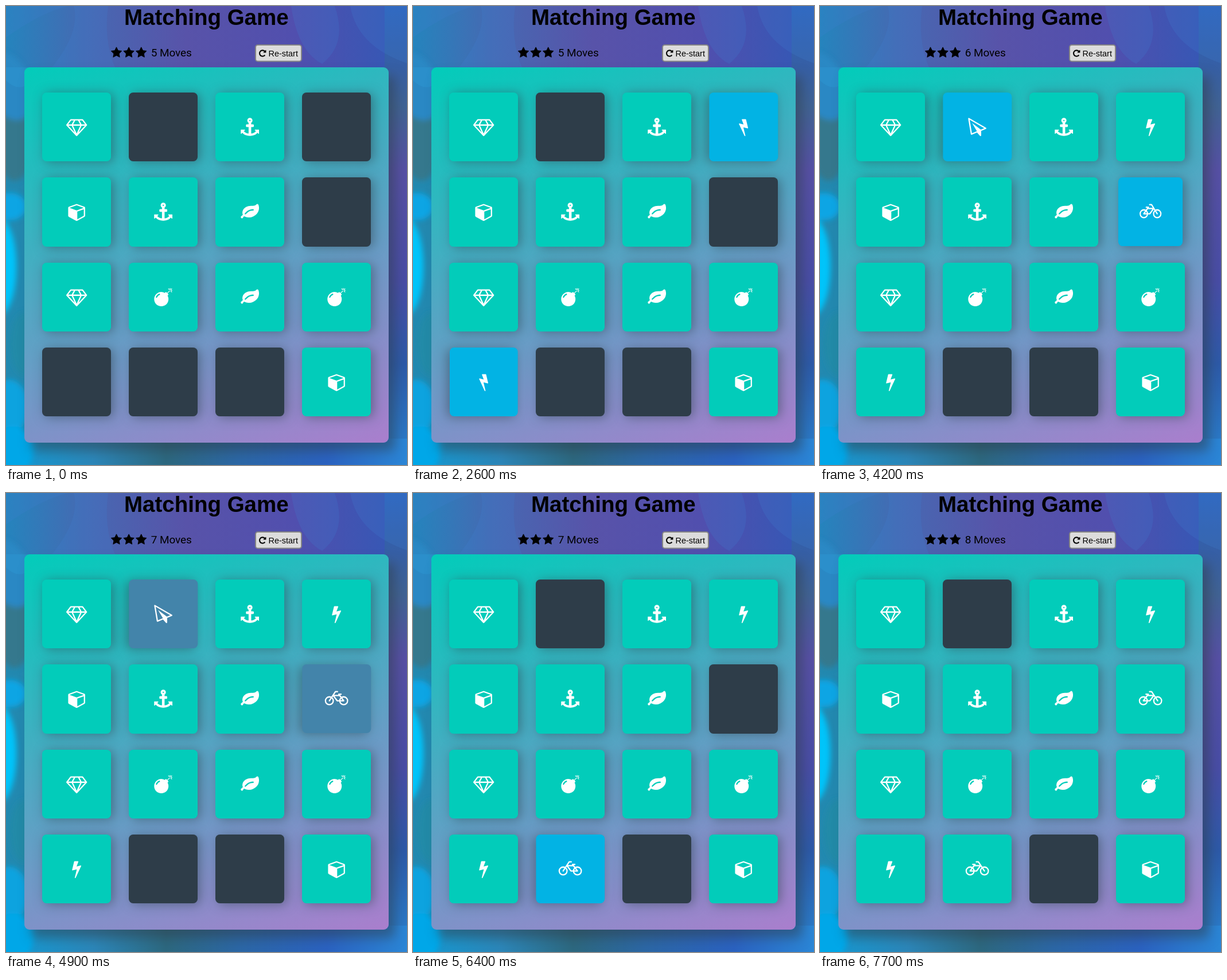
Animation of 699x801 px, one loop 8000 ms. Source, as an HTML page:

```html
<!DOCTYPE html>
<html lang="en">
<head>
<meta charset="utf-8">
<title>Matching Game</title>
<style>
html, body { margin: 0; width: 100%; height: 100%; overflow: hidden; }
#stage { position: relative; width: 699px; height: 801px; overflow: hidden; background: #2b86b8; }
#stage > svg { position: absolute; left: 0; top: 0; }
.deck {
  position: absolute; left: 32px; top: 107px; width: 635px; height: 654.5px; border-radius: 9px;
  background: linear-gradient(160deg, #02ccba 0%, #aa7ecd 100%);
  box-shadow: 11.5px 14.5px 19px 0 rgba(46, 61, 73, .5);
}
.card {
  position: absolute; width: 120.3px; height: 120.3px; border-radius: 7.7px;
  box-shadow: 4.8px 1.9px 19px 0 rgba(46, 61, 73, .5);
}
.card svg { position: absolute; left: 0; top: 0; }
.title { font: bold 38.5px "Liberation Sans", Arial, sans-serif; }
.moves { font: 19px Roboto, sans-serif; letter-spacing: -.1px; }
.label { font: 14.44px "Liberation Sans", Arial, sans-serif; }
</style>
</head>
<body>
<div id="stage">
  <svg width="699" height="801" viewBox="0 0 699 801">
    <defs>
      <linearGradient id="sky">
        <stop offset="0" stop-color="#2584bd"/>
        <stop offset=".2" stop-color="#4669b2"/>
        <stop offset=".45" stop-color="#5853a9"/>
        <stop offset=".72" stop-color="#514fae"/>
        <stop offset="1" stop-color="#3159b6"/>
      </linearGradient>
      <linearGradient id="edge" x2="0" y2="1">
        <stop offset="0" stop-color="#2e64bd"/>
        <stop offset=".13" stop-color="#365fa5"/>
        <stop offset=".22" stop-color="#416394"/>
        <stop offset=".36" stop-color="#5750a5"/>
        <stop offset=".6" stop-color="#494da6"/>
        <stop offset=".78" stop-color="#2d5aa8"/>
        <stop offset="1" stop-color="#2a83d1"/>
      </linearGradient>
      <linearGradient id="floor">
        <stop offset="0" stop-color="#139bd4"/>
        <stop offset=".22" stop-color="#2c86b8"/>
        <stop offset=".4" stop-color="#2d687f"/>
        <stop offset=".58" stop-color="#2c67a5"/>
        <stop offset=".8" stop-color="#2b62c0"/>
        <stop offset="1" stop-color="#2b86d6"/>
      </linearGradient>
      <filter id="soft" x="-30%" y="-30%" width="160%" height="160%"><feGaussianBlur stdDeviation="5"/></filter>
    </defs>
    <rect width="699" height="115" fill="url(#sky)"/>
    <rect y="107" width="40" height="694" fill="#2389b0"/>
    <rect x="660" width="39" height="801" fill="url(#edge)"/>
    <rect y="755" width="699" height="46" fill="url(#floor)"/>
    <g filter="url(#soft)">
      <ellipse cx="15" cy="215" rx="36" ry="90" fill="#36788d"/>
      <ellipse cx="5" cy="140" rx="38" ry="62" fill="#2b88c4" transform="rotate(-22 5 140)"/>
      <ellipse cx="6" cy="350" rx="30" ry="24" fill="#08a5e4"/>
      <ellipse cx="-12" cy="455" rx="30" ry="85" fill="#00c4fa"/>
      <ellipse cx="32" cy="590" rx="26" ry="55" fill="#248aa7"/>
      <ellipse cx="5" cy="700" rx="34" ry="48" fill="#0aa3df"/>
      <ellipse cx="12" cy="775" rx="36" ry="42" fill="#05a7e8"/>
    </g>
    <g fill="#3f7fd0" opacity=".22">
      <path d="M0 55Q60 12 108 0H0ZM80 107Q130 45 118 0H178Q170 60 190 107Z"/>
      <path d="M497 0Q508 78 551 101Q596 66 573 0ZM600 0Q612 70 699 100V0Z"/>
    </g>
    <path d="M0 130Q32 162 62 107H0Z" fill="#2d96d2" opacity=".5"/>
  </svg>
  <div class="deck"></div>
  <svg width="699" height="801" viewBox="0 0 699 801">
    <text class="title" x="206" y="33">Matching Game</text>
    <g id="stars"></g>
    <text class="moves" id="moves" x="252.8" y="87.5"></text>
    <rect x="435" y="68" width="80" height="28.5" rx="4" fill="#dcdcdc" stroke="#858585" stroke-width="2"/>
    <g id="repeat"></g>
    <text class="label" x="457.6" y="88">Re-start</text>
  </svg>
</div>
<script>
const LOOP = 8000, STEP = 100, FLIP = 800, TINT = 400;
const SIZE = 120.3, UNIT = 31.76 / 1792;
const DARK = [46, 61, 73], OPEN = [2, 179, 228], HIT = [2, 204, 186], MISS = [222, 19, 31];

const path = d => `<path d="${d}"/>`;
// glyphs: [width, markup] on an 1792 unit em
const glyphs = {
  diamond: [2048, path('M212 768l623 665-300-665h-323zm812 772l349-772h-698zm-486-900l204-384h-262l-288 384h346zm675 793l623-665h-323zM683 640h682l-204-384h-274zM1510 640h346l-288-384h-262zM1651 154l384 512q14 18 13 41.5t-17 40.5l-960 1024q-18 20-47 20t-47-20l-960-1024q-16-17-17-40.5t13-41.5l384-512q18-26 51-26h1152q33 0 51 26z')],
  anchor: [1792, path('M960 256q0-26-19-45t-45-19-45 19-19 45 19 45 45 19 45-19 19-45zm832 928v352q0 22-20 30-8 2-12 2-12 0-23-9l-93-93q-119 143-318.5 226.5t-429.5 83.5-429.5-83.5-318.5-226.5l-93 93q-9 9-23 9-4 0-12-2-20-8-20-30v-352q0-14 9-23t23-9h352q22 0 30 20 8 19-7 35l-100 100q67 91 189.5 153.5t271.5 82.5v-647h-192q-26 0-45-19t-19-45v-128q0-26 19-45t45-19h192v-163q-58-34-93-92.5t-35-128.5q0-106 75-181t181-75 181 75 75 181q0 70-35 128.5t-93 92.5v163h192q26 0 45 19t19 45v128q0 26-19 45t-45 19h-192v647q149-20 271.5-82.5t189.5-153.5l-100-100q-15-16-7-35 8-20 30-20h352q14 0 23 9t9 23z')],
  bolt: [1792, path('M1333 566q18 20 7 44l-540 1157q-13 25-42 25-4 0-14-2-17-5-25.5-19t-4.5-30l197-808-406 101q-4 1-12 1-18 0-31-11-18-15-13-39l201-825q4-14 16-23t28-9h328q19 0 32 12.5t13 29.5q0 8-5 18l-171 463 396-98q8-2 12-2 19 0 34 15z')],
  cube: [1664, path('M896 1629l640-349v-636l-640 233v752zm-64-865l698-254-698-254-698 254zm832-252v768q0 35-18 65t-49 47l-704 384q-28 16-61 16t-61-16l-704-384q-31-17-49-47t-18-65v-768q0-40 23-73t61-47l704-256q22-8 44-8t44 8l704 256q38 14 61 47t23 73z')],
  leaf: [1792, path('M1280 704q0-26-19-45t-45-19q-172 0-318 49.5t-259.5 134-235.5 219.5q-19 21-19 45 0 26 19 45t45 19q24 0 45-19 27-24 74-71t67-66q137-124 268.5-176t313.5-52q26 0 45-19t19-45zm512-198q0 95-20 193-46 224-184.5 383t-357.5 268q-214 108-438 108-148 0-286-47-15-5-88-42t-96-37q-16 0-39.5 32t-45 70-52.5 70-60 32q-43 0-63.5-17.5t-45.5-59.5q-2-4-6-11t-5.5-10-3-9.5-1.5-13.5q0-35 31-73.5t68-65.5 68-56 31-48q0-4-14-38t-16-44q-9-51-9-104 0-115 43.5-220t119-184.5 170.5-139 204-95.5q55-18 145-25.5t179.5-9 178.5-6 163.5-24 113.5-56.5l29.5-29.5 29.5-28 27-20 36.5-16 43.5-4.5q39 0 70.5 46t47.5 112 24 124 8 96z')],
  bomb: [1792, path('M571 589q-10-25-34-35t-49 0q-108 44-191 127t-127 191q-10 25 0 49t35 34q13 5 24 5 42 0 60-40 34-84 98.5-148.5t148.5-98.5q25-11 35-35t0-49zm942-356l46 46-244 243 68 68q19 19 19 45.5t-19 45.5l-64 64q89 161 89 343 0 143-55.5 273.5t-150 225-225 150-273.5 55.5-273.5-55.5-225-150-150-225-55.5-273.5 55.5-273.5 150-225 225-150 273.5-55.5q182 0 343 89l64-64q19-19 45.5-19t45.5 19l68 68z') +
    '<path fill="none" stroke="#fff" stroke-width="64" stroke-linecap="round" d="M1408 64l91 91M1637 293l91 91M1664 224h96M1568 32v96M1637 155l91-91"/>'],
  plane: [1792, path('M1764 11q33 24 27 64l-256 1536q-5 29-32 45-14 8-31 8-11 0-24-5l-527-215-298 327q-18 21-47 21-14 0-23-4-19-7-30-23.5t-11-36.5v-452l-472-193q-37-14-40-55-3-39 32-59l1664-960q35-21 68 2zm-342 1499l221-1323-1434 827 336 137 863-639-478 797z')],
  bike: [2304, '<g fill="none" stroke="#fff" stroke-width="128" stroke-linecap="round" stroke-linejoin="round"><circle cx="448" cy="1088" r="384"/><circle cx="1856" cy="1088" r="384"/><path d="M928 448L448 1088H1088L1472 576H832M704 448H928M1056 192H1259L1856 1088"/></g>'],
  star: [1792, path('M1728 647q0 22-26 48l-363 354 86 500q1 7 1 20 0 21-10.5 35.5t-30.5 14.5q-19 0-40-12l-449-236-449 236q-22 12-40 12-21 0-31.5-14.5t-10.5-35.5q0-6 2-20l86-500-364-354q-25-27-25-48 0-37 56-46l502-73 225-455q19-41 49-41t49 41l225 455 502 73q56 9 56 46z')],
  repeat: [1792, path('M1664 256v448q0 26-19 45t-45 19h-448q-42 0-59-40-17-39 14-69l138-138q-148-137-349-137-104 0-198.5 40.5t-163.5 109.5-109.5 163.5-40.5 198.5 40.5 198.5 109.5 163.5 163.5 109.5 198.5 40.5q119 0 225-52t179-147q7-10 23-12 15 0 25 9l137 138q9 8 9.5 20.5t-7.5 22.5q-109 132-264 204.5t-327 72.5q-156 0-298-61t-245-164-164-245-61-298 61-298 164-245 245-164 298-61q147 0 284.5 55.5t244.5 156.5l130-129q29-31 70-14 39 17 39 59z')]
};

const faces = ('diamond plane anchor bolt cube anchor leaf bike ' +
  'diamond bomb leaf bomb bolt bike plane cube').split(' ');
const found = new Set([0, 2, 4, 5, 6, 8, 9, 10, 11, 15]);

// each round: two [card, time] picks, then the check and the outcome
const rounds = [
  { picks: [[3, 676], [12, 2016]], check: 2700, end: 3100, hit: true },
  { picks: [[1, 3316], [7, 4110]], check: 4820, end: 5200, hit: false },
  { picks: [[13, 5750], [7, 6580]], check: 7290, end: 7700, hit: true }
];

const $ = id => document.getElementById(id);
const draw = (name, x, y, k) => `<g transform="translate(${x} ${y}) scale(${k})">${glyphs[name][1]}</g>`;

$('stars').innerHTML = [0, 1, 2].map(i => draw('star', 182.3 + i * 21.6, 71.2, .0114)).join('');
$('repeat').innerHTML = draw('repeat', 440, 75.3, 14.44 / 1792);

const cards = faces.map((name, i) => {
  const el = document.createElement('div');
  el.className = 'card';
  el.style.left = 62.7 + i % 4 * 151.1 + 'px';
  el.style.top = 151.2 + Math.floor(i / 4) * 148.25 + 'px';
  const x = SIZE / 2 - glyphs[name][0] * UNIT / 2, y = SIZE / 2 - 896 * UNIT;
  el.innerHTML = `<svg width="120" height="120" fill="#fff">${draw(name, x, y, UNIT)}</svg>`;
  $('stage').append(el);
  return { el, icon: el.firstChild };
});

// cubic-bezier(.25, .1, .25, 1)
function ease(p) {
  if (p <= 0) return 0;
  if (p >= 1) return 1;
  const at = (a, b, s) => 3 * a * s * (1 - s) ** 2 + 3 * b * s * s * (1 - s) + s ** 3;
  let lo = 0, hi = 1;
  for (let i = 0; i < 24; i++) {
    const mid = (lo + hi) / 2;
    if (at(.25, .25, mid) < p) lo = mid; else hi = mid;
  }
  return at(.1, 1, lo);
}

const mix = (a, b, k) => a.map((v, i) => Math.round(v + (b[i] - v) * k));

function cardState(i, t) {
  let state = { color: found.has(i) ? HIT : DARK, shown: found.has(i), angle: 0 };
  for (const { picks, check, end, hit } of rounds) {
    const pick = picks.find(p => p[0] === i);
    if (!pick || t < pick[1]) continue;
    state = t >= end
      ? { color: hit ? HIT : DARK, shown: hit, angle: 0 }
      : {
          color: mix(OPEN, hit ? HIT : MISS, ease((t - check) / TINT)),
          shown: true,
          angle: 180 * ease((t - pick[1]) / FLIP)
        };
  }
  return state;
}

function render(t) {
  cards.forEach(({ el, icon }, i) => {
    const { color, shown, angle } = cardState(i, t);
    el.style.backgroundColor = `rgb(${color})`;
    el.style.transform = angle ? `scaleX(${Math.cos(angle * Math.PI / 180)})` : 'none';
    icon.style.display = shown ? '' : 'none';
  });
  $('moves').textContent = 5 + rounds.filter(r => t >= r.check).length + ' Moves';
}

const start = performance.now();
function tick() {
  const t = (performance.now() - start) % LOOP;
  render(Math.floor(t / STEP) * STEP);
  requestAnimationFrame(tick);
}
tick();
</script>
</body>
</html>
```
